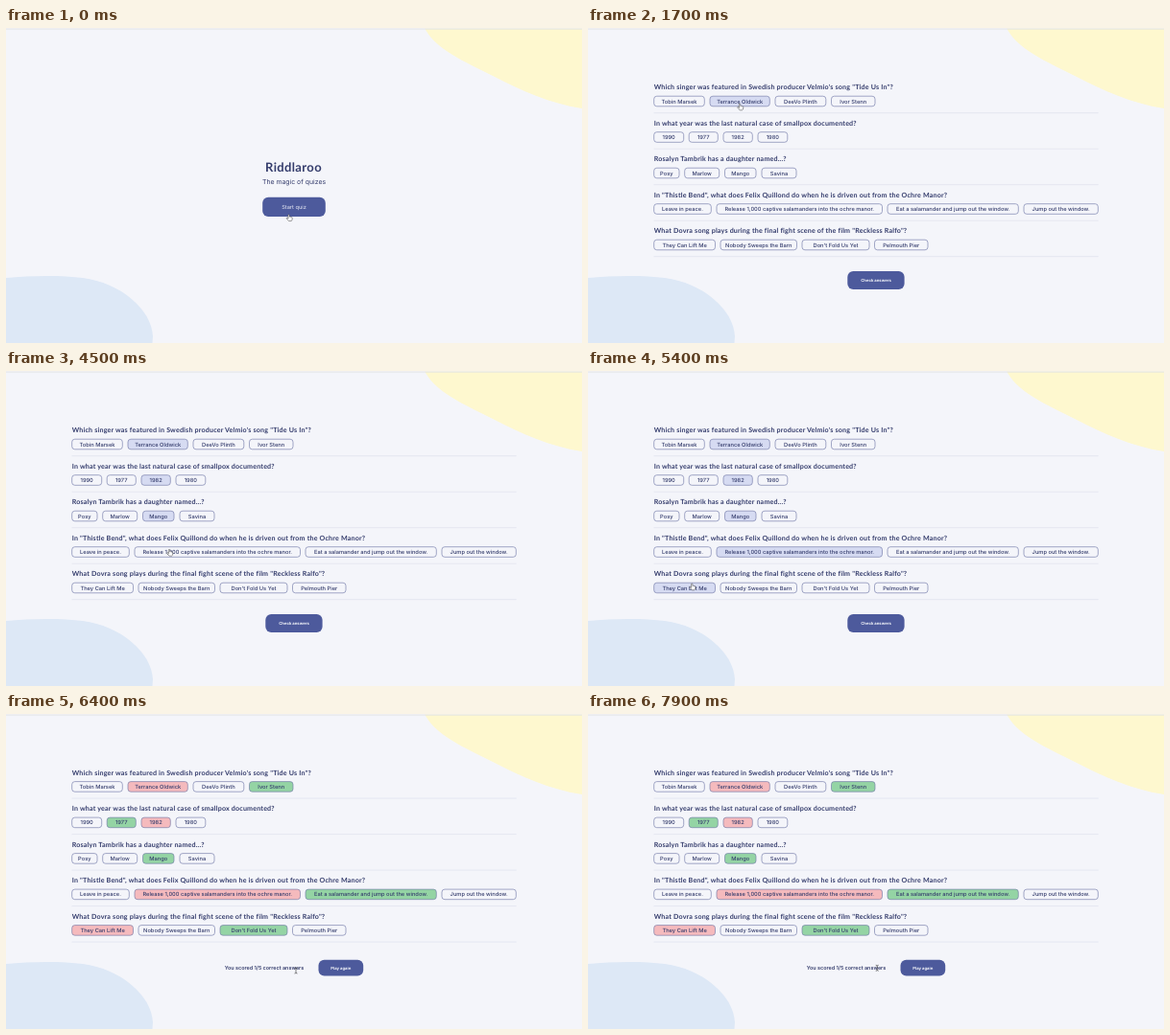
Recreate the animation shown at these times as an HTML page. Size 600 by 329 pixels, loop 8000 ms.

```html
<!DOCTYPE html>
<html lang="en">
<head>
<meta charset="utf-8">
<title>Riddlaroo</title>
<style>
  html, body { margin: 0; width: 100%; height: 100%; overflow: hidden; background: #f4f5fa; }
  svg { display: block; width: 100vw; height: 100vh; cursor: default; }
  text { font-family: Inter, sans-serif; fill: #343c6c; text-rendering: geometricPrecision; white-space: pre; }
  .title { font: 700 13px Lato, sans-serif; letter-spacing: .35px; }
  .lead { font-size: 6.9px; font-weight: 400; }
  .ask { font: 700 7.1px Lato, sans-serif; letter-spacing: .19px; }
  .opt { font-size: 5.72px; font-weight: 500; }
  .score { font-size: 5.45px; font-weight: 600; }
  .start { font-size: 5.65px; fill: #e9ebf5; }
  .act { font-size: 4.2px; font-weight: 700; fill: #f5f7fb; }
  .box { fill: #f4f5fa; stroke: #737ba9; stroke-width: .65; }
  .picked { fill: #d6dbf2; }
  .right { fill: #94d4a4; }
  .wrong { fill: #f5babd; }
  .solid { fill: #4d5a9c; }
  .rule { stroke: #dfe1ee; stroke-width: .7; }
</style>
</head>
<body>
<svg id="stage" viewBox="0 0 600 329" preserveAspectRatio="none">
  <rect width="600" height="329" fill="#f4f5fa"/>
  <path fill="#fef8cf" d="M436 0C446 19 467 30 494 43.5C528 60.5 560 78 600 84V0Z"/>
  <path fill="#dde8f6" d="M0 261C25 258.5 58 258 80 261C119 266 152 294 153 322L152.5 329H0Z"/>
  <rect width="600" height=".6" fill="#f6f6f7"/>
  <rect y=".6" width="600" height=".9" fill="#e0e1e4"/>
  <g id="intro"></g>
  <g id="quiz"></g>
  <g id="check"></g>
  <g id="result"></g>
  <g id="cursor" stroke-linejoin="round" stroke-linecap="round">
    <path id="arrow" fill="#111" stroke="#fff" stroke-width=".5"
      d="M0 0V5.7L1.3 4.5L2.2 6.5L3.1 6.1L2.2 4.2L4 4.1Z"/>
    <path id="hand" fill="#fff" stroke="#333" stroke-width=".5"
      d="M-.7 .7Q-.7 0 0 0Q.7 0 .7 .7V2.4Q1.4 2 1.8 2.6Q2.5 2.3 2.8 2.9Q3.7 2.7 3.7 3.6V4.6Q3.7 6.4 2.6 6.8H.2Q-.9 6 -2.3 4Q-2.3 3.1 -1.5 3.4L-.7 4.1Z"/>
    <path id="beam" fill="none" stroke="#333" stroke-width=".6"
      d="M-1.1 -3Q0 -3 0 -2.3V2.3Q0 3 -1.1 3M1.1 -3Q0 -3 0 -2.3M0 2.3Q0 3 1.1 3"/>
  </g>
</svg>
<script>
const LOOP = 8000, QUIZ = 600, CHECKED = 6300;
const $ = id => document.getElementById(id);

// Each option: label, left edge, right edge.
const questions = [
  { ask: 'Which singer was featured in Swedish producer Velmio\'s song "Tide Us In"?', pick: 1, right: 3, at: 1700,
    opts: [['Tobin Marsek', 68.7, 121.3], ['Terrance Oldwick', 127, 189.3], ['DeeVo Plinth', 195, 247.8], ['Ivor Stenn', 253.5, 299]] },
  { ask: 'In what year was the last natural case of smallpox documented?', pick: 2, right: 1, at: 2500,
    opts: [['1990', 68.7, 99.7], ['1977', 105.2, 135.3], ['1982', 141, 171.3], ['1980', 177, 207.8]] },
  { ask: 'Rosalyn Tambrik has a daughter named...?', pick: 2, right: 2, at: 3400,
    opts: [['Posy', 68.7, 95], ['Marlow', 100.7, 136.7], ['Mango', 142.5, 175], ['Savina', 181, 217]] },
  { ask: 'In "Thistle Bend", what does Felix Quillond do when he is driven out from the Ochre Manor?', pick: 1, right: 2, at: 4700,
    opts: [['Leave in peace.', 68.7, 128.3], ['Release 1,000 captive salamanders into the ochre manor.', 134, 306.5],
      ['Eat a salamander and jump out the window.', 312, 448.3], ['Jump out the window.', 454, 531.3]] },
  { ask: 'What Dovra song plays during the final fight scene of the film "Reckless Ralfo"?', pick: 0, right: 2, at: 5400,
    opts: [['They Can Lift Me', 68.7, 132.5], ['Nobody Sweeps the Barn', 138, 217.5], ["Don't Fold Us Yet", 223, 293], ['Pelmouth Pier', 298.5, 354]] }
];

// Pointer stops: time, x, y.
const stops = [
  [0, 294.5, 194.8], [1000, 294.5, 194.8], [1500, 158, 79], [1700, 158, 79],
  [2400, 156, 112], [2650, 156, 112], [3000, 157.3, 143.5], [3300, 158, 150], [3600, 158, 150],
  [4400, 170, 186.3], [4750, 170, 186.3], [5200, 108.2, 222], [5450, 108.2, 222],
  [6000, 302, 268], [7200, 302, 268], [7800, 301.2, 265.3], [LOOP, 301.2, 265.3]
];

function add(parent, tag, attrs, label) {
  const el = document.createElementNS('http://www.w3.org/2000/svg', tag);
  for (const k in attrs) el.setAttribute(k, attrs[k]);
  if (label) el.textContent = label;
  parent.appendChild(el);
  return el;
}
const write = (g, cls, x, y, label, anchor = 'middle') =>
  add(g, 'text', { class: cls, x, y, 'text-anchor': anchor }, label);
const box = (g, cls, x, y, r, b, rx) =>
  add(g, 'rect', { class: cls, x, y, width: r - x, height: b - y, rx });

const zones = [];
const zone = (type, on, x, y, r, b) => zones.push({ type, on, x, y, r, b });
const inIntro = t => t < QUIZ, inQuiz = t => t >= QUIZ;
const open = t => inQuiz(t) && t < CHECKED, done = t => t >= CHECKED;

write($('intro'), 'title', 299.5, 149.8, 'Riddlaroo');
write($('intro'), 'lead', 300, 162.5, 'The magic of quizes');
box($('intro'), 'solid', 267.2, 176.8, 332.8, 197.1, 6);
write($('intro'), 'start', 300, 189, 'Start quiz');
zone('hand', inIntro, 267, 176.8, 333, 197.4);

questions.forEach((q, i) => {
  const g = $('quiz'), mid = 76.5 + 37.5 * i;
  const head = write(g, 'ask', 68.7, mid - 12.1, q.ask, 'start');
  zone('beam', inQuiz, 68.7, mid - 18, 68.7 + head.getComputedTextLength(), mid - 10);
  q.boxes = q.opts.map(([label, x, r]) => {
    const el = box(g, 'box', x, mid - 5.3, r, mid + 5.3, 3);
    write(g, 'opt', (x + r) / 2, mid + 2.1, label);
    zone('hand', inQuiz, x, mid - 5.3, r, mid + 5.3);
    return el;
  });
  add(g, 'line', { class: 'rule', x1: 68.5, x2: 531.7, y1: mid + 12.2, y2: mid + 12.2 });
});

box($('check'), 'solid', 270.3, 254, 329.6, 273, 6);
write($('check'), 'act', 300, 265.2, 'Check answers');
zone('hand', open, 270.3, 254, 329.6, 273);

write($('result'), 'score', 227.7, 267.2, 'You scored 1/5 correct answers', 'start');
box($('result'), 'solid', 325.5, 256.8, 372.2, 273.6, 6);
write($('result'), 'act', 348.8, 266.7, 'Play again');
zone('beam', done, 227.7, 260, 312, 271);

function pointer(t) {
  let i = 1;
  while (i < stops.length - 1 && t >= stops[i][0]) i++;
  const [t0, x0, y0] = stops[i - 1], [t1, x1, y1] = stops[i];
  const u = (t - t0) / (t1 - t0), e = u * u * (3 - 2 * u);
  return [x0 + (x1 - x0) * e, y0 + (y1 - y0) * e];
}

const show = (id, on) => $(id).setAttribute('display', on ? 'inline' : 'none');

function optionClass(q, j, t) {
  if (done(t)) {
    if (j === q.right) return 'box right';
    return j === q.pick ? 'box wrong' : 'box';
  }
  return j === q.pick && t >= q.at ? 'box picked' : 'box';
}

function draw(t) {
  show('intro', inIntro(t));
  show('quiz', inQuiz(t));
  show('check', open(t));
  show('result', done(t));
  $('quiz').setAttribute('transform', `translate(0 ${done(t) ? -0.6 : 0})`);
  for (const q of questions)
    q.boxes.forEach((el, j) => el.setAttribute('class', optionClass(q, j, t)));

  const [x, y] = pointer(t);
  const hit = zones.find(z => z.on(t) && x >= z.x && x <= z.r && y >= z.y && y <= z.b);
  const type = hit ? hit.type : 'arrow';
  for (const id of ['arrow', 'hand', 'beam']) show(id, id === type);
  $('cursor').setAttribute('transform', `translate(${x} ${y})`);
}

const begin = performance.now();
function tick() {
  draw((performance.now() - begin) % LOOP);
  requestAnimationFrame(tick);
}
tick();
</script>
</body>
</html>
```
